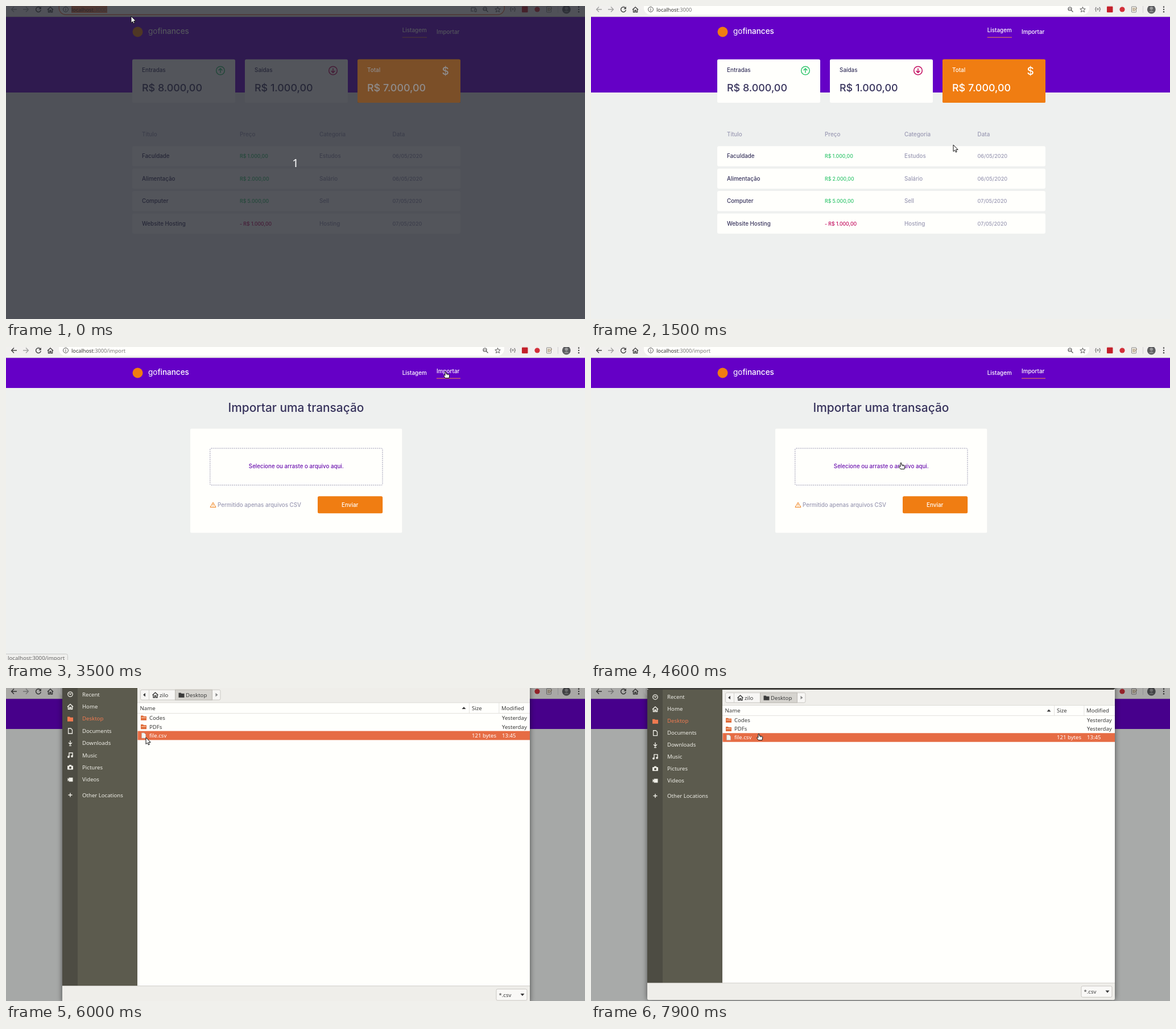
Write an HTML page that moves like this. It is 1018 px wide and 550 px high and loops after 8 s.

```html
<!DOCTYPE html>
<html lang="pt">
<head>
<meta charset="utf-8">
<title>gofinances</title>
<style>
  html, body { margin: 0; width: 100%; height: 100%; overflow: hidden; background: #eef0ef; }
  svg { display: block; width: 100%; height: 100%; }
  text { font: 500 9.9px Inter, "Open Sans", sans-serif; }
  .ui text { font: 400 9.6px "Noto Sans", "Open Sans", sans-serif; }
  .window { filter: drop-shadow(0 0 5px rgba(0, 0, 0, .55)); }
</style>
</head>
<body>
<svg id="stage" viewBox="0 0 1018 550"></svg>
<script>
const LOOP = 8000;
const ORANGE = '#f07d12', PURPLE = '#6500c6', WHITE = '#fffffc', PAGE = '#eef0ef';
const INK = '#37335c', MUTED = '#9a99b3', GREEN = '#2fc56b', RED = '#c2085c', ACCENT = '#e66c44';

// SVG string helpers
const text = (x, y, s, fill = INK, size = 0, attrs = '') =>
  `<text x="${x}" y="${y}" fill="${fill}" ${size ? `style="font-size:${size}px"` : ''} ${attrs}>${s}</text>`;
const rect = (x, y, w, h, fill, r = 0, attrs = '') =>
  `<rect x="${x}" y="${y}" width="${w}" height="${h}" rx="${r}" fill="${fill}" ${attrs}/>`;
const circle = (x, y, r, fill, attrs = '') => `<circle cx="${x}" cy="${y}" r="${r}" fill="${fill}" ${attrs}/>`;
const line = (x, y, d, color, w = 1.2, attrs = '') =>
  `<path transform="translate(${x} ${y})" d="${d}" fill="none" stroke="${color}" stroke-width="${w}" ${attrs}/>`;
const solid = (x, y, d, color, attrs = '') =>
  `<path transform="translate(${x} ${y})" d="${d}" fill="${color}" ${attrs}/>`;
const group = (id, body, attrs = '') => `<g id="${id}" ${attrs}>${body}</g>`;

const HOUSE = 'M-5 0L0-4.6 5 0M-3.5-1V4.2H-1V1H1V4.2H3.5V-1';
const FOLDER = 'M-5-4H-1L0-2.8H5V4.2H-5Z';
const FILE = 'M-3.4-4.5H1L3.5-2V4.5H-3.4Z';

const toolbar = () =>
  rect(0, 0, 1018, 19, '#f1f0ee') + rect(0, 18.4, 1018, .8, '#d5d3d0') +
  rect(93, -10, 783, 25.5, WHITE, 12) +
  group('focus',
    rect(93.3, -10, 783, 25.2, 'none', 12, 'stroke="#e9764e" stroke-width="1.4"') +
    rect(115, 0, 63, 12, '#ef7c4c') +
    line(822, 6, 'M-4 2V-3H4M-5 3H0M2-1H5V4H2Z', '#555', 1)) +
  group('back', line(14, 6, 'M5 0H-4M0-4.4L-4.4 0 0 4.4', 'currentColor', 1.4)) +
  line(35, 6, 'M-5 0H4M0-4.4L4.4 0 0 4.4', '#a3a3a3', 1.4) +
  group('reload', line(57, 6, 'M3.6-2.4A4.4 4.4 0 1 0 4.3 1', '#444', 1.4) + solid(57, 6, 'M4.8-5V-.6H.4Z', '#444')) +
  group('stop', line(57, 6, 'M-4-4L4 4M4-4L-4 4', '#444', 1.5)) +
  line(78, 6.5, HOUSE, '#444', 1.4) +
  circle(105, 6, 4.4, 'none', 'stroke="#555"') + line(105, 6, 'M0-2.4V-1.2M0-.4V2.6', '#555', 1.1) +
  `<text x="115" y="9.5" fill="#333" style="font-size:9.2px">localhost<tspan fill="#777">:3000</tspan><tspan id="path" fill="#777">/import</tspan></text>` +
  circle(842, 5, 3, 'none', 'stroke="#555" stroke-width="1.2"') + line(842, 5, 'M2 2L5.5 5.5M-1.5 0H1.5', '#555', 1.2) +
  line(864.5, 6.3, 'M0-4.7L1.3-1.5 4.7-1.3 2.1.9 3 4.3 0 2.4-3 4.3-2.1.9-4.7-1.3-1.3-1.5Z', '#555', 1) +
  text(891, 9, '{=}', '#333', 8, 'text-anchor="middle" font-weight="700"') +
  group('extOn', rect(907, .8, 10.5, 10.5, '#c3202a', 1)) +
  group('extOff', rect(908, 1.3, 9, 9.5, 'none', 1, 'stroke="#bbb" stroke-dasharray="1.5 1"')) +
  circle(934, 6, 4.6, '#d2303a') +
  rect(950.5, 1, 8, 10, '#f7f5ee', 1, 'stroke="#888"') + line(955, 6, 'M-3-2H2M-3 0H1M-3 2H0M0 3L5-3', '#98805c', 1) +
  rect(970, 0, .8, 12, '#ccc') +
  circle(985.3, 6, 7.4, '#5c5d60') + circle(985.3, 4, 2.8, '#98989a') + solid(985.3, 11, 'M-4.5 0Q0-7 4.5 0Z', '#88898b') +
  [1.8, 6, 10.2].map(y => circle(1007, y, 1.2, '#444')).join('');

const header = (height, active) => {
  const item = (name, x, w, id) => {
    const on = name === active;
    return text(x, on ? 45.6 : 48.8, name, '#fff', 0, `id="${id}"`) +
      (on ? rect(x, 54.6, w, 1, '#f48a45') : '');
  };
  return rect(0, 19, 1018, 531, PAGE) + rect(0, 19, 1018, height, PURPLE) + circle(231.5, 45.5, 9, ORANGE) +
    `<text x="250" y="49.3" fill="#fff" style="font-size:13.5px;font-weight:400">go<tspan font-weight="500">finances</tspan></text>` +
    item('Listagem', 696.7, 43.3, 'l' + height) + item('Importar', 757, 42, 'i' + height);
};

const total = (bg, fg) => rect(618, 93.7, 181, 76.4, bg, 2.5) + text(635, 116.3, 'Total', fg) +
  text(772.7, 120.6, '$', fg, 19, 'text-anchor="middle" font-weight="300"') + text(635, 150, 'R$ 7.000,00', fg, 17.9);

const roundArrow = (x, color, d) =>
  circle(x, 113.5, 7.3, 'none', `stroke="${color}" stroke-width="1.5"`) + line(x, 113.5, d, color, 1.5);

const dashboard = () => {
  const cols = [239, 411, 551, 679.5];
  const rows = [
    ['Faculdade', 'R$ 1.000,00', 'Estudos', '06/05/2020'],
    ['Alimentação', 'R$ 2.000,00', 'Salário', '06/05/2020'],
    ['Computer', 'R$ 5.000,00', 'Sell', '07/05/2020'],
    ['Website Hosting', '- R$ 1.000,00', 'Hosting', '07/05/2020']
  ];
  const row = (r, i) => {
    const y = 246.3 + i * 39.4;
    const style = [[INK, 9.8], [r[1][0] === '-' ? RED : GREEN, 8.7], [MUTED, 9.8], [MUTED, 9.1]];
    return rect(222, y, 577, 35.4, WHITE, 3) + r.map((s, c) => text(cols[c], y + 21, s, ...style[c])).join('');
  };
  return header(133, 'Listagem') +
    rect(222, 93.7, 181, 76.4, WHITE, 2.5) + rect(420, 93.7, 181, 76.4, WHITE, 2.5) +
    rect(618, 93.7, 181, 76.4, ORANGE, 2.5) +
    text(239, 116.3, 'Entradas') + text(437, 116.3, 'Saídas') +
    roundArrow(377, GREEN, 'M0 4V-3.6M-3.3-.4L0-3.7 3.3-.4') +
    roundArrow(575, RED, 'M0-4V3.6M-3.3.4L0 3.7 3.3.4') +
    ['Título', 'Preço', 'Categoria', 'Data'].map((s, c) => text(cols[c], 228.5, s, MUTED)).join('') +
    group('data', text(239, 150, 'R$ 8.000,00', INK, 17.9) + text(437, 150, 'R$ 1.000,00', INK, 17.9) +
      total(ORANGE, '#fff') + rows.map(row).join(''));
};

const importer = () => header(53, 'Importar') +
  text(510, 114.3, 'Importar uma transação', INK, 20.9, 'text-anchor="middle"') +
  rect(324, 143.5, 372.3, 183, WHITE, 2) +
  rect(358.8, 178, 303.2, 64.7, 'none', 2, `stroke="${MUTED}" stroke-dasharray="2.2 1.4"`) +
  text(510.3, 213, 'Selecione ou arraste o arquivo aqui.', '#6a0fae', 9.75, 'text-anchor="middle"') +
  line(364, 277.5, 'M0-4.4L5 4H-5ZM0-1.5V1.3M0 2.2V3', ORANGE, 1, 'stroke-linejoin="round"') +
  text(372, 280.5, 'Permitido apenas arquivos CSV', MUTED, 9.77) +
  rect(548, 262.3, 114.2, 30, ORANGE, 2.5) + text(604.7, 280.5, 'Enviar', '#fff', 0, 'text-anchor="middle"');

const fileRow = (name, y, size, when, color, icon) => icon + text(252, y + 3.5, name, color) +
  text(862, y + 3.5, size, color, 0, 'text-anchor="end"') + text(872, y + 3.5, when, color);

const dialog = () => {
  const pale = '#eeede6', dark = '#3b3b3b', border = '#c9c7c2';
  const icons = [
    c => circle(113, 11, 4.2, 'none', `stroke="${c}" stroke-width="1.3"`) + line(113, 11, 'M-2-1.5L0 .5 2-1.5', c),
    c => line(113, 33, HOUSE, c, 1.5),
    c => solid(113, 54.5, FOLDER, c),
    c => line(113, 75.5, FILE, c, 1.3),
    c => line(113, 97, 'M0-4.5V2M-3-1L0 2 3-1M-2 4.4H2', c, 1.4),
    c => line(113, 118, 'M-2 3V-4H4V2', c, 1.4) + circle(110, 121, 1.9, c) + circle(116, 120, 1.9, c),
    c => rect(108, 136.5, 10, 7, c, 1.2) + rect(111, 135, 4, 2, c) + circle(113, 140, 2, '#4d4c43'),
    c => rect(110.5, 157.5, 7, 7, c) + solid(108.5, 161, 'M0 0V-3L3 0 0 3Z', c),
    c => line(113, 188, 'M-3.5 0H3.5M0-3.5V3.5', c, 1.4)
  ];
  const places = ['Recent', 'Home', 'Desktop', 'Documents', 'Downloads', 'Music', 'Pictures', 'Videos', 'Other Locations'];
  const place = (s, i) => {
    const c = s === 'Desktop' ? '#f07a50' : pale;
    return icons[i](c) + text(134, (i < 8 ? 11 + i * 21.4 : 188) + 3.5, s, c);
  };
  const folder = y => solid(242, y, FOLDER, '#df6a38') + rect(238, y - 1, 8, 1.4, '#f6c3a2');
  const sheet = solid(242, 83.5, FILE, '#f5f4f0', 'stroke="#bbb" stroke-width=".7"');
  return rect(99, -30, 822, 584, '#efeeea', 3, 'class="window"') +
    rect(99, -30, 822, 27.7, '#3f3e3a', 3) +
    rect(99, -2.3, 27, 525.6, '#4d4c43') + rect(126, -2.3, 105, 525.6, '#5c5b4e') + places.map(place).join('') +
    rect(236.5, 3.2, 140.5, 17.8, '#f7f6f4', 2.5, `stroke="${border}"`) +
    rect(297.5, 3.2, 65, 17.8, '#d6d4cf', 0, `stroke="#bcb9b3"`) + rect(251, 3.2, .8, 17.8, border) +
    solid(243, 12, 'M2-3.2V3.2L-2 0Z', dark) + solid(370.5, 12, 'M-2-3.2V3.2L2 0Z', '#888') +
    line(262.5, 12.5, HOUSE, dark, 1.4) + text(270, 16, 'zilo', dark) +
    solid(308.5, 12.5, FOLDER, dark) + text(316, 16, 'Desktop', dark) +
    rect(231, 26, 690, 497.3, WHITE) + rect(231, 25.5, 690, .8, '#d8d6d1') + rect(231, 44, 690, .8, '#dcdad6') +
    rect(814, 26, .8, 18, '#dcdad6') + rect(866.5, 26, .8, 18, '#dcdad6') +
    text(235.5, 38.7, 'Name', dark) + text(819, 38.7, 'Size', dark) + text(871, 38.7, 'Modified', dark) +
    solid(805, 35, 'M-3.5 2H3.5L0-2Z', dark) +
    fileRow('Codes', 52.5, '', 'Yesterday', dark, folder(52.5)) +
    fileRow('PDFs', 68, '', 'Yesterday', dark, folder(68)) +
    group('plain', fileRow('file.csv', 83.5, '121 bytes', '13:45', dark, sheet)) +
    group('picked', rect(231.5, 75.6, 689.5, 15.8, ACCENT) + fileRow('file.csv', 83.5, '121 bytes', '13:45', '#fff', sheet)) +
    rect(99, 523, 822, .8, border) +
    rect(862, 529, 54, 20, '#f9f8f6', 2.5, `stroke="${border}"`) + text(866.5, 542.8, '*.csv', dark) +
    solid(908, 539, 'M-3.5-2H3.5L0 2.2Z', dark);
};

const cursors = () =>
  group('arrow', solid(0, 0, 'M0 0V11.6L2.7 9.2 4.4 13 6.2 12.2 4.6 8.4H8.2Z', '#fff', 'stroke="#111" stroke-width="1" stroke-linejoin="round"')) +
  group('hand', solid(0, 0, 'M-1 1Q0-.3 1 1V4L5.5 5Q7 5.4 6.7 7L6 11.5H-.8L-3.6 7.3Q-3.6 5.8-1 7.2Z', '#fff', 'stroke="#111" stroke-width="1" stroke-linejoin="round"') +
    line(0, 0, 'M2.4 4.5V6.5M4.4 5V6.8', '#111', .7));

document.getElementById('stage').innerHTML =
  group('home', dashboard()) + group('import', importer()) + group('blank', rect(0, 19, 1018, 531, WHITE)) +
  group('bar', toolbar(), 'class="ui"') +
  group('status', rect(-3, 539.5, 111.5, 14, '#efefed', 3, 'stroke="#c8c8c6"') + text(3, 550, 'localhost:3000/import', '#666', 9.7), 'class="ui"') +
  group('shade', rect(0, 0, 1018, 550, '#000')) + group('dialog', dialog(), 'class="ui"') +
  group('dim', rect(0, 0, 1018, 550, 'rgba(32,35,43,.77)') + total('#7b4f28', '#8f8c8c') +
    group('count', text(509, 282.6, '1', '#fff', 20, 'text-anchor="middle"'), 'class="ui"')) +
  group('cursor', cursors());

// Pointer path: time, x, y
const PATH = [
  [0, 220, 18], [1100, 220, 18], [1300, 420, 165], [1500, 637, 244], [1600, 849, 281], [1700, 828, 133],
  [1800, 828, 133], [2400, 751, 62], [2700, 773, 43], [3500, 773, 43], [3900, 643, 140], [4000, 643, 140],
  [4100, 593, 174], [4200, 593, 174], [4400, 556, 203], [4500, 556, 203], [4600, 545, 203], [5200, 545, 203],
  [5700, 246, 87], [6000, 246, 87], [6400, 921, 14], [6800, 309, 54], [6900, 308, 53], [7100, 308, 53],
  [7400, 295, 80], [8000, 295, 80]
];
const pointer = t => {
  const i = PATH.findIndex(p => p[0] > t), [t0, x0, y0] = PATH[i - 1], [t1, x1, y1] = PATH[i];
  const u = (t - t0) / (t1 - t0);
  return [x0 + (x1 - x0) * u, y0 + (y1 - y0) * u];
};

const el = id => document.getElementById(id);
const show = (id, on) => el(id).style.display = on ? '' : 'none';
const clamp = v => Math.max(0, Math.min(1, v));

function draw(t) {
  const within = (a, b) => t >= a && t < b;
  const loading = within(500, 700), imported = t >= 3500, intro = t < 500;
  show('dim', intro);
  show('focus', intro);
  show('blank', loading);
  show('stop', within(500, 800));
  show('reload', !within(500, 800));
  show('extOn', !loading);
  show('extOff', loading);
  show('data', !within(500, 800));
  show('home', !imported);
  show('import', imported);
  show('path', imported);
  el('back').style.color = imported ? '#444' : '#a3a3a3';
  el('i133').style.opacity = 1 - .4 * clamp((t - 2700) / 200);
  show('status', within(2800, 4100));
  el('status').style.opacity = clamp((t - 2700) / 200);

  // The dialog unfolds and folds vertically about its centre
  const open = clamp((t - 4830) / 250), close = clamp((t - 7865) / 250);
  const scale = open * (2 - open) - close * close;
  show('dialog', scale > 0);
  el('dialog').setAttribute('transform', `translate(0 262) scale(1 ${scale}) translate(0 -262)`);
  el('shade').style.opacity = .3 * scale;
  show('picked', t >= 6000);
  show('plain', t < 6000);

  const hand = within(2700, 3600) || within(4300, 5100) || t >= 7600;
  show('hand', hand);
  show('arrow', !hand);
  el('cursor').setAttribute('transform', `translate(${pointer(t)})`);
}

const start = performance.now();
function tick() {
  const t = (performance.now() - start) % LOOP;
  draw(Math.floor(t / 100) * 100);
  requestAnimationFrame(tick);
}
tick();
</script>
</body>
</html>
```
